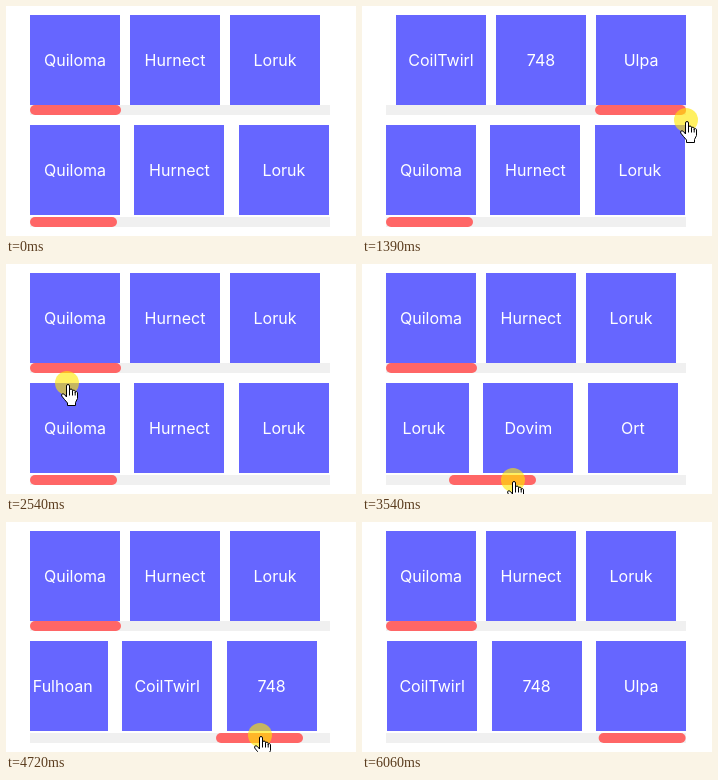
An HTML page that plays this animation: 350 by 230 pixels, repeating every 6840 ms.

```html
<!DOCTYPE html>
<html lang="en">
<head>
<meta charset="utf-8">
<title>Scroll bars</title>
<style>
  html, body { margin: 0; width: 100%; height: 100%; overflow: hidden; background: #fff; }
  #stage { position: relative; width: 350px; height: 230px; overflow: hidden; }
  .list, .track { position: absolute; left: 24px; width: 300px; overflow: hidden; }
  .list { height: 90px; }
  .track { height: 10px; background: #f0f0f0; }
  .tile {
    position: absolute; top: 0; width: 90px; height: 90px;
    background: #66f; color: #fff; text-align: center;
    font: 16px/91px Inter, "Open Sans", sans-serif;
  }
  .row { position: absolute; left: 0; top: 0; }
  .thumb { height: 10px; border-radius: 5px; background: #f66; }
  #cursor { position: absolute; left: 0; top: 0; overflow: visible; }
</style>
</head>
<body>
<div id="stage"></div>
<script>
const LOOP = 6840, END = 6060, FPS = 13;
const VIEW = 300, TILE = 90;
const names = ["Quiloma", "Hurnect", "Loruk", "Dovim", "Ort",
               "Morvane", "Fulhoan", "CoilTwirl", "748", "Ulpa"];

// Pointer path: tick, x, y
const path = [
  [1, 303, 182], [6, 92, 117], [8, 92, 117], [13, 228, 113], [17, 312, 114],
  [19, 335, 114], [21, 335, 115], [25, 254, 115], [30, 118, 117], [33, 61, 119],
  [39, 85, 216], [42, 85, 216], [47, 167, 216], [52, 265, 216], [56, 338, 215],
  [60, 279, 214], [61, 254, 213], [70, 27, 215], [72, 27, 215], [78, 350, 216]
];

const stage = document.getElementById("stage");

function add(parent, className, style = {}) {
  const el = document.createElement("div");
  el.className = className;
  Object.assign(el.style, style);
  parent.append(el);
  return el;
}

function makeScroller(listTop, trackTop, pitch) {
  const width = pitch * (names.length - 1) + TILE;
  const thumbWidth = VIEW * VIEW / width;
  const maxThumb = VIEW - thumbWidth;
  const row = add(add(stage, "list", { top: listTop + "px" }), "row");
  names.forEach((name, i) => {
    add(row, "tile", { left: i * pitch + "px" }).textContent = name;
  });
  const track = add(stage, "track", { top: trackTop + "px" });
  const thumb = add(track, "thumb", { width: thumbWidth + "px" });
  return offset => {
    const x = Math.max(0, Math.min(maxThumb, offset));
    thumb.style.transform = `translateX(${x}px)`;
    row.style.transform = `translateX(${-Math.round(x * width / VIEW)}px)`;
  };
}

const scrollTop = makeScroller(9, 99, 100);
const scrollBottom = makeScroller(119, 211, 104.45);

stage.insertAdjacentHTML("beforeend", `
  <svg id="cursor" width="1" height="1">
    <circle r="12" fill="#ffe600" fill-opacity=".62"/>
    <path transform="translate(-6 1)" fill="#fff" stroke="#000" stroke-linejoin="round"
      d="M5.5 13V2a1.5 1.5 0 0 1 3 0V7V6.5a1.5 1.5 0 0 1 3 0V8V7.2a1.4 1.4 0 0 1 2.7 0
         V9V8.5a1.2 1.2 0 0 1 2.3 0V14.5L14.5 18.5V21.5H6.5V19L3.5 15.5L.7 12
         Q0 10 2 9.7Q3.5 10 5.5 13ZM8.5 7V11.5M11.5 8V11.5M14.2 9V11.5"/>
  </svg>`);
const cursor = document.getElementById("cursor");

function pointerAt(tick) {
  const i = path.findIndex(key => key[0] >= tick);
  if (i < 1) return path[0].slice(1);
  const [t0, x0, y0] = path[i - 1], [t1, x1, y1] = path[i];
  const k = (tick - t0) / (t1 - t0);
  return [x0 + (x1 - x0) * k, y0 + (y1 - y0) * k].map(Math.round);
}

function draw(time) {
  const done = time >= END;
  const tick = done ? 79 : Math.floor((time + 9) * FPS / 1000);
  const [x, y] = pointerAt(tick);
  cursor.style.visibility = tick < 1 || done ? "hidden" : "visible";
  cursor.style.transform = `translate(${x}px, ${y}px)`;

  // The grab point shifts slightly after each turn at the end of a track.
  const topHeld = tick >= 9 && tick <= 34;
  scrollTop(topHeld ? x - (tick < 20 ? 91 : 86) : 0);
  const bottomGrab = tick > 56 && tick < 73 ? 68 : 88;
  scrollBottom(done ? VIEW : tick >= 43 ? x - bottomGrab : 0);
}

const start = performance.now();
function frame() {
  draw((performance.now() - start) % LOOP);
  requestAnimationFrame(frame);
}
draw(0);
requestAnimationFrame(frame);
</script>
</body>
</html>
```
